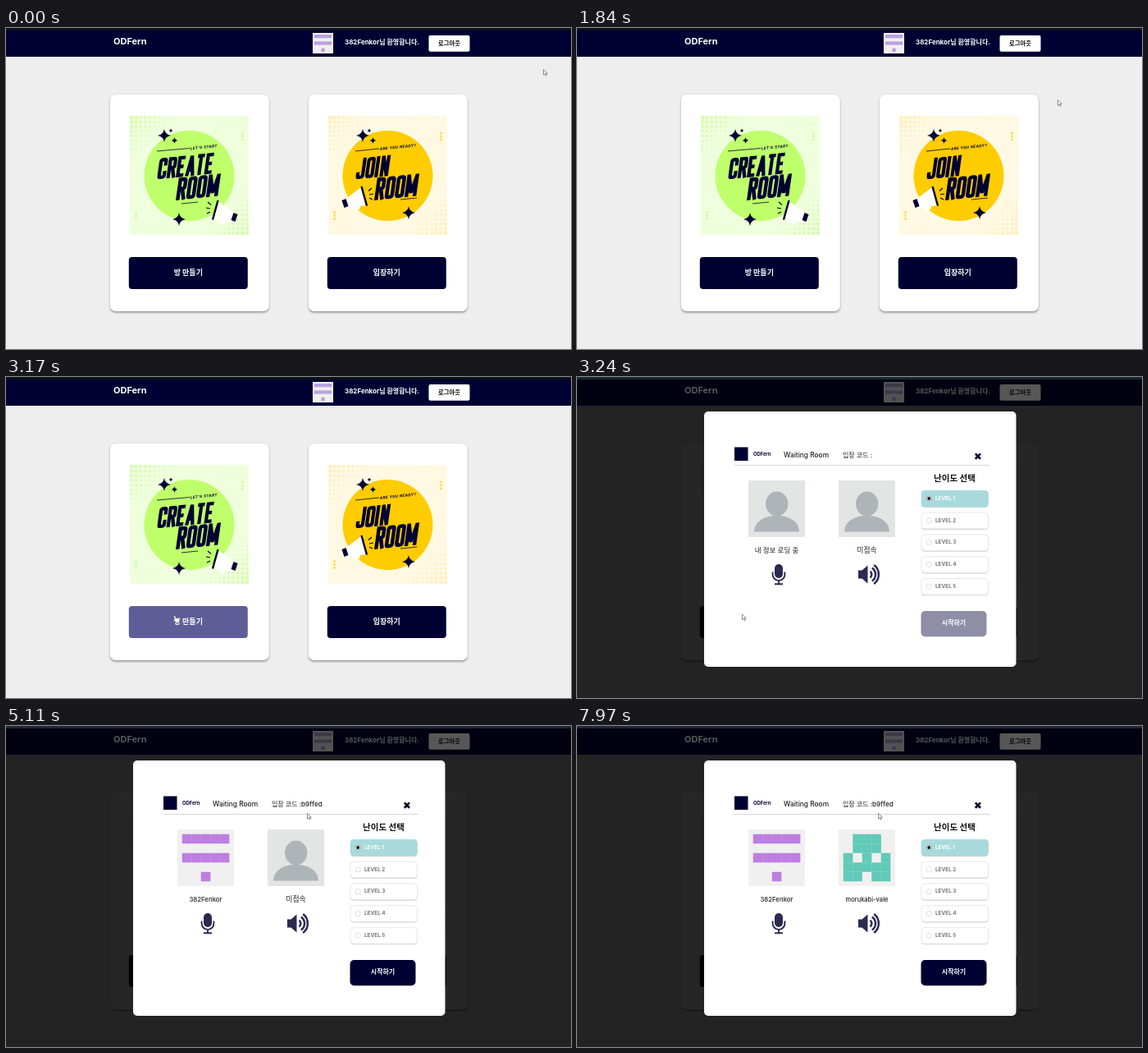
An HTML page for the animation above (8 s loop, 689 by 391 pixels).

```html
<!DOCTYPE html>
<html lang="ko">
<head>
<meta charset="utf-8">
<title>Waiting Room</title>
<style>
html, body { margin: 0; width: 100%; height: 100%; overflow: hidden; background: #eee; }
svg { display: block; width: 689px; height: 391px; }
text { font-family: Inter, 'Noto Sans CJK KR', 'Noto Sans CJK', sans-serif; font-weight: 700; }
.mid { text-anchor: middle; }
.med { font-weight: 500; }
</style>
</head>
<body>
<svg id="stage" viewBox="0 0 689 391" xmlns="http://www.w3.org/2000/svg"></svg>
<script>
const LOOP = 8000, OPEN = 3240, LOADED = 3800, JOINED = 7420;
const NAVY = '#000033', BRAND = 'ODFern', ME = '382Fenkor', PEER = 'morukabi-vale';

const rect = (x, y, w, h, fill, r = 0, more = '') =>
  `<rect x="${x}" y="${y}" width="${w}" height="${h}" rx="${r}" fill="${fill}" ${more}/>`;
const dot = (x, y, r, fill, more = '') =>
  `<circle cx="${x}" cy="${y}" r="${r}" fill="${fill}" ${more}/>`;
const path = (d, fill, more = '') => `<path d="${d}" fill="${fill}" ${more}/>`;
const line = (d, width, color = NAVY) =>
  path(d, 'none', `stroke="${color}" stroke-width="${width}"`);
const text = (x, y, size, fill, str, cls = '', more = '') =>
  `<text x="${x}" y="${y}" font-size="${size}" fill="${fill}" class="${cls}" ${more}>${str}</text>`;
const group = (id, body) => `<g id="${id}">${body}</g>`;

// Block lettering of the posters
const GLYPHS = {
  A: 'M-.5 22L3-1L6.5 22M1 15H5',
  C: 'M6 7V2Q6 0 4 0H2Q0 0 0 2V18Q0 20 2 20H4Q6 20 6 18V13',
  E: 'M6.5 0H0V20H6.5M0 10H5.5',
  I: 'M0-2V22',
  J: 'M6-2V18Q6 20 4 20H2Q0 20 0 18V14',
  M: 'M0 22V-2M9 22V-2M0-1L4.5 18L9-1',
  N: 'M0 22V-2M6 22V-2M0-1L6 21',
  O: 'M2 0H4Q6 0 6 2V18Q6 20 4 20H2Q0 20 0 18V2Q0 0 2 0Z',
  R: 'M0 22V0H4Q6 0 6 2V8Q6 10 4 10H0M3.5 10L6.5 22',
  T: 'M-1 0H7M3 0V22'
};
function lettering(word, x, y, scale) {
  let at = 2, out = '';
  for (const c of word) {
    out += `<path transform="translate(${at} -22)" d="${GLYPHS[c]}"/>`;
    at += c === 'I' ? 6 : 11;
  }
  return `<g role="img" aria-label="${word}" fill="none" stroke="${NAVY}" stroke-width="4"
    transform="translate(${x} ${y}) rotate(-6) skewX(-14) scale(${scale})">${out}</g>`;
}

function sparkle(x, y, r) {
  const k = r * 0.14;
  return path(`M${x} ${y - r}Q${x + k} ${y - k} ${x + r} ${y}Q${x + k} ${y + k} ${x} ${y + r}` +
    `Q${x - k} ${y + k} ${x - r} ${y}Q${x - k} ${y - k} ${x} ${y - r}`, NAVY);
}

function megaphone(x, y, flip) {
  return `<g transform="translate(${x} ${y}) scale(${flip} 1)">` +
    path('M4-11L24 4L21 14L13 13L11 18L6 16L5 12L-3 11Z', '#fff') +
    path('M22.5 3L27.5 5L24.5 14L19.5 12Z', NAVY) +
    line('M3.5-12L-3 11.5', 2.4) +
    line('M-9-10L-5-6.5M-11-3L-6-2M-10 4L-6 2', 1.2) + '</g>';
}

function halftone(color) {
  let out = '';
  for (let i = 0; i < 12; i++) for (let j = 0; j < 12; j++) {
    const r = 2.5 - (i + j) * 0.2;
    if (r < 0.3) continue;
    const x = 2 + i * 5.6, y = 2 + j * 5.6;
    out += dot(x, y, r, color) + dot(145 - x, 145 - y, r, color);
  }
  for (let i = 0; i < 7; i++) for (let j = 0; j < 2; j++) {
    out += dot(105 + i * 5.8, 4.5 + j * 5.5, 0.7, color) + dot(4 + i * 5.8, 135 + j * 5.5, 0.7, color);
  }
  return out;
}

function poster(x, s) {
  let out = `<svg x="${x}" y="107" width="145" height="145" viewBox="0 0 145 145">` +
    rect(0, 0, 145, 145, s.paper) + halftone(s.dots);
  for (let i = 0; i < 3; i++) {
    out += dot(137.5, 21 + i * 4, 1.4, s.trio) + dot(7.5, 117.5 + i * 4, 1.4, s.trio);
  }
  out += dot(72.5, 73, 55, s.disc) +
    sparkle(42, 24, 8) + sparkle(54.5, 30, 4) + sparkle(50, 18, 2.6) + sparkle(...s.star) +
    line(s.rule, 0.8) +
    text(s.tagX, s.tagY, 4.6, NAVY, s.tag, '', `letter-spacing=".35" font-style="italic" transform="rotate(-6 ${s.tagX} ${s.tagY})"`) +
    lettering(s.word, 33, 77.5, 1.05) + lettering('ROOM', 56, 103, 1.12) +
    line(s.under, 0.8) + megaphone(...s.horn);
  return out + '</svg>';
}

const createStyle = {
  paper: '#efffdd', dots: '#d9fbb4', trio: '#d3f7a8', disc: '#bfff6b', star: [60, 126, 8],
  rule: 'M33 43L73 39.5', tag: "LET'S START", tagX: 74, tagY: 41.5, word: 'CREATE',
  under: 'M63 107L83 105', horn: [104, 115, 1]
};
const joinStyle = {
  paper: '#fff9e4', dots: '#fff0c2', trio: '#ffd84a', disc: '#ffcc00', star: [98, 118, 8],
  rule: 'M33 43L62 40', tag: 'ARE YOU READY?', tagX: 63, tagY: 42, word: 'JOIN',
  under: 'M88 102L108 100', horn: [44, 98, -1]
};

function card(x, style, label, id) {
  return rect(x, 81, 194, 265, '#9b9b9b', 7, 'filter="url(#soft)"') +
    rect(x, 81, 194, 264, '#fff', 7) + poster(x + 24.2, style) +
    rect(x + 23, 279, 145, 39, NAVY, 4, `id="${id}"`) +
    text(x + 95.5, 301, 9, '#fff', label, 'mid');
}

// Five by five pixel avatar
function pixels(x, y, size, rows, color) {
  const pad = size / 12, cell = size / 6;
  let out = rect(x, y, size, size, '#f0f0f0');
  rows.forEach((row, j) => [...row].forEach((c, i) => {
    if (c === '1') out += rect(x + pad + i * cell, y + pad + j * cell, cell + 0.1, cell, color);
  }));
  return out;
}
const myRows = ['11111', '00000', '11111', '00000', '00100'];
const peerRows = ['01110', '01110', '10101', '11111', '11011'];

const person = x => rect(x, 126, 69, 69, '#e3e5e4', 1) +
  `<ellipse cx="${x + 34.7}" cy="154.5" rx="13.7" ry="15" fill="#afb4b8"/>` +
  path(`M${x + 7} 188.5C${x + 7} 162 ${x + 62} 162 ${x + 62} 188.5Z`, '#afb4b8');

function level(n) {
  const y = 138.3 + (n - 1) * 26.8, on = n === 1;
  return rect(420, y + 0.8, 81.5, 20, '#d2d2d2', 4, 'filter="url(#faint)"') +
    rect(420, y, 81.5, 19.8, on ? '#a8dadc' : '#fff', 4, `stroke="${on ? '#a8dadc' : '#dedede'}" stroke-width=".7"`) +
    dot(429.2, y + 9.7, 3.2, '#fff', `stroke="${on ? '#777' : '#ccc'}" stroke-width=".6"`) +
    (on ? dot(429.2, y + 9.7, 1.9, '#000') : '') +
    text(437, y + 11.4, 6.4, on ? '#fff' : '#777', 'LEVEL ' + n);
}

const INK = '#2b2b52';
const mic = rect(241, 228, 10, 17, INK, 5) +
  line('M238.6 237.5V240.5A7.4 7.4 0 0 0 253.4 240.5V237.5M246 247.5V252.5M241 252.3H251', 1.9, INK);
const speaker = path('M343 235.5H347.5L354.5 229.5V251.5L347.5 245.5H343Z', INK) +
  line('M357.5 236.6A5 5 0 0 1 357.5 244.4M359.8 232.6A9.5 9.5 0 0 1 359.8 248.4M362.2 229A14.5 14.5 0 0 1 362.2 252', 2.5, INK);

const page = rect(0, 0, 689, 391, '#eee') +
  card(126.8, createStyle, '방 만들기', 'create') + card(368.8, joinStyle, '입장하기', 'join');

const header = rect(0, 0, 689, 35, NAVY) +
  text(131, 20.3, 11, '#fff', BRAND) +
  pixels(374, 6, 25, myRows, '#b79fdc') +
  text(413, 20, 8, '#fff', ME + '님 환영합니다.') +
  rect(515.5, 9, 50, 19.7, '#fff', 2) +
  text(540.5, 21.4, 7.4, '#111', '로그아웃', 'mid');

const modal = rect(155, 42, 380.5, 311, '#fff', 5) +
  rect(192, 85.5, 16.5, 16.5, NAVY) +
  text(215, 95.8, 5.8, NAVY, BRAND) +
  text(252, 98.2, 8.4, '#222', 'Waiting Room', 'med') +
  text(324, 98.2, 8, '#222', '입장 코드 :', 'med') +
  line('M485.8 93.4L492 99.8M492 93.4L485.8 99.8', 2.7, '#0c0c2c') +
  line('M192 107.5H503', 0.8, '#ccc') +
  text(460.5, 127.3, 10.5, '#111', '난이도 선택', 'mid') +
  [1, 2, 3, 4, 5].map(level).join('') + mic + speaker +
  rect(419.5, 285, 80, 31.3, NAVY, 5, 'id="start"') +
  text(459.5, 302.3, 8, '#fff', '시작하기', 'mid') +
  group('meWait', person(209) + text(243.5, 214.3, 8.5, '#222', '내 정보 로딩 중', 'mid med')) +
  group('meHere', pixels(209, 126, 69, myRows, '#bd7ee1') +
    text(243.5, 214, 7.8, '#222', ME, 'mid med') + text(360, 98.2, 8.2, '#222', 'b9ffed', 'med')) +
  group('peerWait', person(319) + text(353.5, 214.3, 8.8, '#222', '미접속', 'mid med')) +
  group('peerHere', pixels(319, 126, 69, peerRows, '#61cab8') +
    text(353.5, 214, 7.5, '#222', PEER, 'mid med'));

const arrow = path('M0 0V6.6L1.6 5.2L2.7 7.6L3.8 7.1L2.8 4.8H4.8Z', '#fff', 'stroke="#444" stroke-width=".6"');
const hand = path('M.5 0Q1.6-.4 2 .8L2.8 3L6 3.6Q7.4 4 7.2 5.4L6.6 8.4H2.8L-.4 5.2Q0 4 1.4 4.8L0 1Q-.2.2.5 0Z',
  '#fff', 'stroke="#333" stroke-width=".5"');

const $ = id => document.getElementById(id);
$('stage').innerHTML =
  `<defs><filter id="soft" x="-5%" y="-5%" width="110%" height="110%"><feOffset dy=".8"/><feGaussianBlur stdDeviation=".9"/></filter>
  <filter id="faint" x="-5%" y="-15%" width="110%" height="130%"><feGaussianBlur stdDeviation=".6"/></filter></defs>` +
  page + header + rect(0, 0, 689, 3, '#0b1318') +
  group('dialog', rect(0, 35, 689, 356, '#000', 0, 'opacity=".85"') +
    rect(0, 0, 689, 35, '#000', 0, 'opacity=".66"') + rect(0, 0, 689, 3, '#1a2832') + modal) +
  group('arrow', arrow) + group('hand', hand);

// Pointer track: time, x, y
const track = [
  [1010, 655.5, 50.5], [1500, 648, 55], [1770, 621, 71], [1840, 587, 87.5], [2180, 356, 143],
  [2500, 203, 259], [2670, 204.5, 290.5], [3170, 204.5, 290.5], [3240, 201.5, 289],
  [3590, 201.5, 289], [4210, 367.5, 106.5]
];
function pointer(t) {
  if (t <= track[0][0]) return track[0].slice(1);
  for (let i = 1; i < track.length; i++) {
    const [t0, x0, y0] = track[i - 1], [t1, x1, y1] = track[i];
    if (t <= t1) {
      const k = (t - t0) / (t1 - t0);
      return [x0 + (x1 - x0) * k, y0 + (y1 - y0) * k];
    }
  }
  return track[track.length - 1].slice(1);
}

const show = (id, on) => $(id).setAttribute('visibility', on ? 'visible' : 'hidden');

function draw(t) {
  const [x, y] = pointer(t);
  const open = t >= OPEN, loaded = t >= LOADED, joined = t >= JOINED;
  const hover = !open && x > 150 && x < 295 && y > 279 && y < 318;
  $('create').setAttribute('fill', hover ? '#5f5d98' : NAVY);
  $('start').setAttribute('fill', loaded ? NAVY : '#8e8ea6');
  show('dialog', open);
  show('meWait', open && !loaded);
  show('meHere', loaded);
  show('peerWait', open && !joined);
  show('peerHere', joined);
  show('arrow', !hover);
  show('hand', hover);
  for (const id of ['arrow', 'hand']) $(id).setAttribute('transform', `translate(${x} ${y})`);
}

const begin = performance.now();
function tick() {
  draw((performance.now() - begin) % LOOP);
  requestAnimationFrame(tick);
}
draw(0);
requestAnimationFrame(tick);
</script>
</body>
</html>
```
